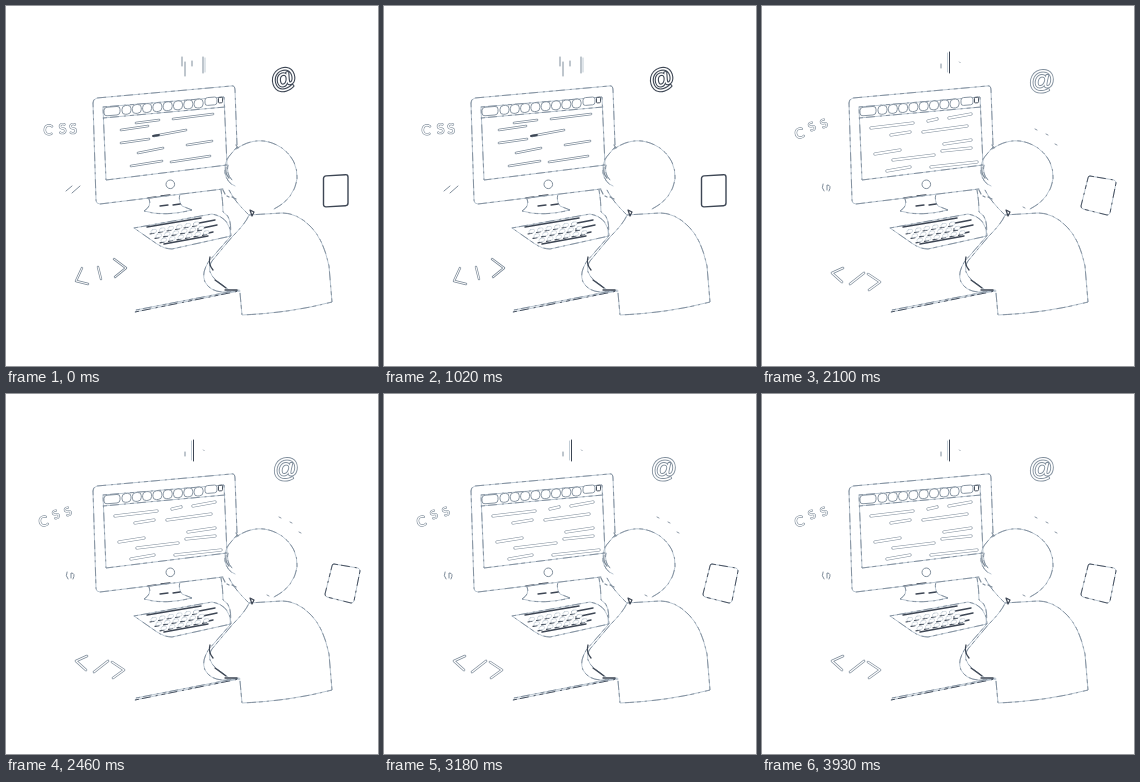
An HTML page with a canvas for the animation above (3990 ms loop, 372 by 360 pixels).

```html
<!DOCTYPE html>
<html lang="en">
<head>
<meta charset="utf-8">
<title>Coder at a desk</title>
<style>
html, body { margin: 0; width: 100%; height: 100%; overflow: hidden; background: #fff; }
canvas { display: block; width: 372px; height: 360px; }
</style>
</head>
<body>
<canvas id="stage" width="372" height="360"></canvas>
<script>
const ctx = document.getElementById('stage').getContext('2d');
const LOOP = 3990, SWAP = 1980;
const LIGHT = '#b3c0cc', MID = '#7f8d9b', DARK = '#3d4654';

ctx.lineJoin = 'round';

function line(d, color = LIGHT, width = 0.8) {
  ctx.lineCap = 'round';
  ctx.strokeStyle = color;
  ctx.lineWidth = width;
  ctx.stroke(new Path2D(d));
}

// Pale outline with broken darker touches.
function sketch(d, color = MID) {
  line(d, LIGHT, 0.9);
  ctx.setLineDash([4, 3, 9, 5, 2, 4]);
  ctx.lineCap = 'butt';
  ctx.strokeStyle = color;
  ctx.stroke(new Path2D(d));
  ctx.setLineDash([]);
}

// Hollow stroke: only its rim shows.
function tube(d, width, color = MID, rim = 0.7) {
  line(d, color, width);
  line(d, '#fff', width - 2 * rim);
}

function glyph(text, x, y, size, angle, color, rim, font = 'Lato') {
  ctx.save();
  ctx.translate(x, y);
  ctx.rotate(angle);
  ctx.font = `${size}px "${font}", sans-serif`;
  ctx.textAlign = 'center';
  ctx.textBaseline = 'middle';
  ctx.strokeStyle = color;
  ctx.lineWidth = rim * 2;
  ctx.strokeText(text, 0, 0);
  ctx.fillStyle = '#fff';
  ctx.fillText(text, 0, 0);
  ctx.restore();
}

function box(x, y, w, h, r, slope, color, width) {
  ctx.save();
  ctx.transform(1, slope, 0, 1, x, y);
  ctx.beginPath();
  ctx.roundRect(0, 0, w, h, r);
  ctx.fillStyle = '#fff';
  ctx.fill();
  ctx.strokeStyle = color;
  ctx.lineWidth = width;
  ctx.stroke();
  ctx.restore();
}

function drawMonitor() {
  sketch('M143 193Q146 200 138 205Q158 211 186 204L176 200Q172 195 174 188');
  line('M142 192L150 191M155 190L164 189M154 200L162 199M167 199L174 198', DARK, 1.3);
  sketch('M87 97Q87 93 91 92L225 80Q229 79 229 84L231 139M217 183L94 198Q90 198 90 194L87 97');
  sketch('M97 101L218 91L221 159L100 174L97 101M97 112L219 101');
  box(98, 101.5, 16, 8.5, 3, -0.08, MID, 0.9);
  for (let i = 0; i < 8; i++) {
    box(116 + i * 10.3, 99.8 - i * 0.9, 9, 8.8, 3.6, -0.08, MID, 0.9);
  }
  box(199, 91.8, 12, 7.8, 2.5, -0.08, MID, 0.9);
  box(212.5, 91.5, 4, 5.5, 1, -0.08, DARK, 0.9);
  ctx.beginPath();
  ctx.arc(164.3, 178.3, 4.3, 0, Math.PI * 2);
  ctx.strokeStyle = MID;
  ctx.lineWidth = 1;
  ctx.stroke();
}

function drawKeyboard() {
  sketch('M128 222L206 208Q224 211 225 230L166 243Q158 243 151 238L128 222');
  line('M141 221L195 212M188 218L209 214M192 223L211 219M198 228L207 226M158 238L202 230', DARK, 1.5);
  for (let row = 0; row < 3; row++) {
    for (let k = 0; k < 6; k++) {
      const x = 145 + k * 8.5 + row * 5, y = 224 - k * 1.5 + row * 4.4;
      line(`M${x - 1} ${y + 4}l4 -0.8`, DARK, 1.2);
      box(x, y, 5.5, 3.4, 1.5, -0.17, LIGHT, 0.5);
    }
  }
}

function drawPerson() {
  sketch('M215 184Q217 195 217 206Q227 211 224 231Q211 246 203 255Q195 267 199 276Q204 285 216 286L234 285');
  sketch('M223 184Q229 196 243 209Q240 217 226 231L206 255Q199 265 211 275L222 283');
  sketch('M243 209Q258 208 276 207Q291 207 304 220Q317 232 323 260L326 296Q284 307 236 309L234 287');
  sketch('M129 306L233 285', DARK);
  sketch('M130 304L233 284');
  line('M204 251Q202 258 207 264M209 274L220 282M219 284L231 284', DARK, 1.3);

  sketch('M230 143Q253 127 276 142Q292 154 291 173Q288 193 268 203');
  sketch('M231 141L225 148Q218 155 219 167Q221 177 229 180M222 159Q220 168 226 174');
  line('M230 139L232 142M220 161Q219 168 223 172M217 184L219 188M221 190L223 191M226 191L230 193', MID, 1.2);
  line('M244 204L248 206L246 210Z', DARK, 1.2);
}

function drawFirstPose() {
  tube('M167 113L207 108M130 117L153 114M115 124L142 120M148 130L180 124M115 137L143 133M181 139L206 135M132 147L157 142M125 160L156 155M165 156L204 150', 2.6);
  line('M147 130L153 129', DARK, 1.8);
  line('M176 51L176 60M179 56L179 70M186 55L186 60M197 51L197 67', MID, 1);
  line('M199 52L199 66');
  glyph('C', 42, 124.5, 14, 0.1, MID, 0.6);
  glyph('S', 56.5, 123.5, 14, -0.1, MID, 0.6);
  glyph('S', 67, 123.5, 14, -0.1, MID, 0.6);
  line('M60 185L66 180M66 187L74 180', MID, 1);
  tube('M76 262L70 275L82 278M92 261L95 273M108 253L120 262L109 271', 2.4);
  glyph('@', 278, 74, 26, -0.3, DARK, 1.1, 'Liberation Sans');
  box(317.5, 170, 24.5, 31, 2.5, -0.06, DARK, 1.4);
}

function drawSecondPose() {
  tube('M109 122L151 117M166 115L175 113M187 112L209 108M129 129L148 126M161 126L205 120M182 138L209 134M113 148L138 144M131 154L172 149M180 145L209 142M125 165L148 161M169 161L215 156', 3.2);
  line('M179 58L179 62M197.5 56L198 56.5', MID, 1);
  line('M185.5 47L185.5 66');
  line('M187.5 46L187.5 67', DARK, 1);
  glyph('C', 37.5, 128, 14, -0.25, MID, 0.6);
  glyph('S', 50, 121, 12, -0.5, MID, 0.6);
  glyph('S', 62, 118, 12, -0.5, MID, 0.6);
  line('M61 178Q59 182 62 185M65 184L65 179Q70 179 67 185', MID, 1);
  tube('M81 262L70 267L80 276M102 267L88 278M106 268L118 276L107 284', 2.6);
  glyph('@', 280, 75.5, 26, 0, MID, 0.9, 'Liberation Sans');
  sketch('M328 170L352 174Q354 175 354 177L348 207Q347 209 345 209L321 203Q319 202 319 200L326 172Q326 170 328 170Z', DARK);
  line('M273 123L275 124M284 128L286 129M293 138L295 139M261 201L263 202', MID, 0.9);
}

function frame(now) {
  const t = now % LOOP;
  ctx.fillStyle = '#fff';
  ctx.fillRect(0, 0, 372, 360);
  drawMonitor();
  if (t < SWAP) drawFirstPose();
  else drawSecondPose();
  drawKeyboard();
  drawPerson();
  requestAnimationFrame(frame);
}

frame(performance.now());
</script>
</body>
</html>
```
